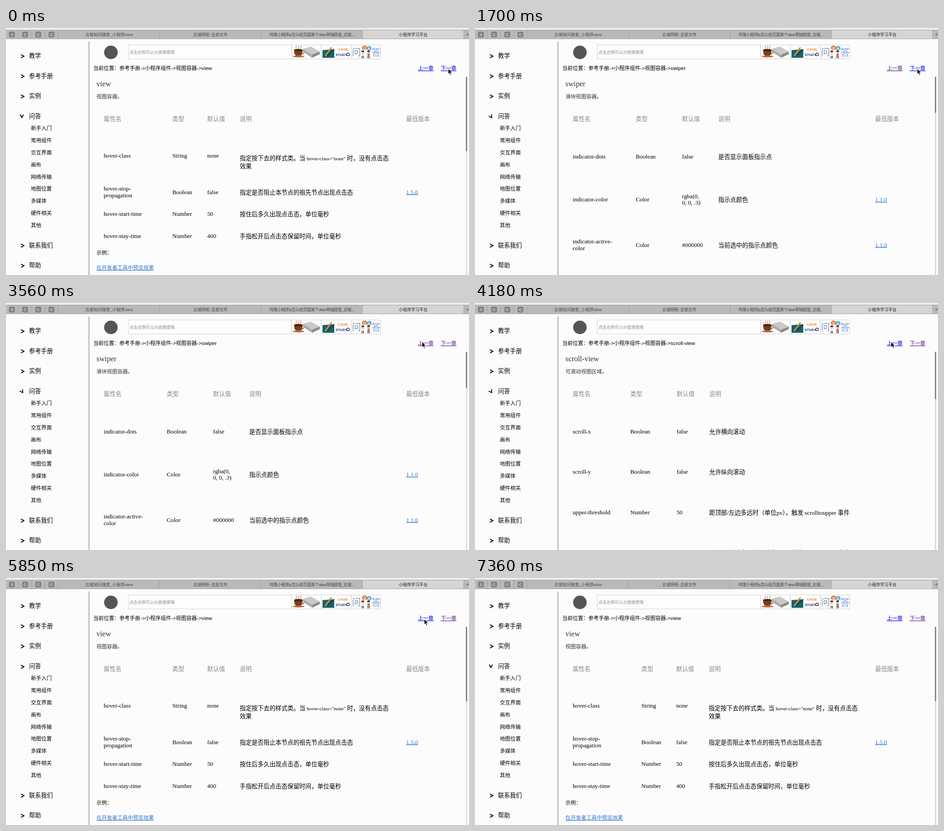
These frames come from a looping animation (1024 by 547 pixels, 7810 ms). An HTML page:

```html
<!DOCTYPE html>
<html lang="zh-CN">
<head>
<meta charset="utf-8">
<title>小程序学习平台</title>
<style>
html, body { margin: 0; width: 100%; height: 100%; overflow: hidden; background: #fcfcfc; }
svg { display: block; width: 100vw; height: 100vh; }
text { font: 11.55px "Liberation Sans", "Noto Sans CJK SC", sans-serif; fill: #000; }
.serif { font-family: "Liberation Serif", "Noto Sans CJK SC", serif; }
.tiny { font-size: 9.08px; }
.cell { font-size: 13.2px; }
.title { font-size: 16.5px; fill: #333; }
.note { fill: #333; }
.soft { fill: #888; }
.bold { font-weight: bold; fill: #222; }
.link { fill: #2f74d0; text-decoration: underline; }
.nav { text-decoration: underline; }
.code { font-size: 10.9px; }
.code-small { font-size: 9.9px; }
.mid { text-anchor: middle; }
</style>
</head>
<body>
<svg id="stage" viewBox="0 0 1024 547" preserveAspectRatio="none"></svg>
<script>
const LOOP = 7810;
const BLUE = '#0000ee', PURPLE = '#551a8b';

const text = (x, y, str, cls = '', extra = '') =>
  `<text x="${x}" y="${y}" class="${cls}" ${extra}>${str}</text>`;
const rect = (x, y, w, h, fill, extra = '') =>
  `<rect x="${x}" y="${y}" width="${w}" height="${h}" fill="${fill}" ${extra}/>`;
const line = (d, stroke, width = 1) =>
  `<path d="${d}" fill="none" stroke="${stroke}" stroke-width="${width}"/>`;

const cell = (x, y, str) => text(x, y, str, 'serif cell');
const link = (x, y, str, size = '') => text(x, y, str, 'serif link ' + size);
const title = (y, str) => text(200, y, str, 'serif title');
const note = (y, str) => text(200, y, str, 'serif note');
const row = (y, xs, values) => values.map((v, i) => cell(xs[i], y, v)).join('');
const wrapped = (x, y, step, lines) => lines.map((s, i) => cell(x, y + i * step, s)).join('');
const header = (y, xs, hasVersion = true) =>
  ['属性名', '类型', '默认值', '说明'].map((s, i) => text(xs[i], y, s, 'serif cell soft')).join('') +
  (hasVersion ? text(885, y, '最低版本', 'serif cell soft') : '');
const support = y => text(200, y,
  '基础库 1.2.0 开始支持，低版本需做<tspan class="link">兼容处理</tspan>', 'serif soft');

function viewPage() {
  const xs = [216, 368, 445, 517];
  return title(129, 'view') + note(156, '视图容器。') + header(206, xs) +
    row(287, xs, ['hover-class', 'String', 'none']) +
    wrapped(517, 293, 18, [
      '指定按下去的样式类。当 <tspan class="code">hover-class="none"</tspan> 时，没有点击态', '效果']) +
    wrapped(216, 360, 14.5, ['hover-stop-', 'propagation']) +
    row(367.5, xs.slice(1), ['Boolean', 'false']) +
    cell(517, 369, '指定是否阻止本节点的祖先节点出现点击态') + link(885, 367.5, '1.5.0', 'cell') +
    row(416, xs, ['hover-start-time', 'Number', '50']) + cell(517, 417, '按住后多久出现点击态，单位毫秒') +
    row(465, xs, ['hover-stay-time', 'Number', '400']) + cell(517, 466, '手指松开后点击态保留时间，单位毫秒') +
    text(200, 502, '示例：', 'serif', 'font-weight="500"') +
    link(200, 535, '在开发者工具中预览效果');
}

function scrollPage() {
  const xs = [216, 343.5, 446, 518];
  const rows = [
    ['scroll-x', 'Boolean', 'false', '允许横向滚动'],
    ['scroll-y', 'Boolean', 'false', '允许纵向滚动'],
    ['upper-threshold', 'Number', '50', '距顶部/左边多远时（单位px），触发 scrolltoupper 事件'],
    ['lower-threshold', 'Number', '50', '距底部/右边多远时（单位px），触发 scrolltolower 事件']
  ];
  return title(129, 'scroll-view') + note(156, '可滚动视图区域。') + header(206, xs, false) +
    rows.map((r, i) => row(289 + i * 89.3, xs, r.slice(0, 3)) + cell(518, 290 + i * 89.3, r[3])).join('');
}

function swiperPage() {
  const xs = [216, 355.5, 458, 538];
  return title(129, 'swiper') + note(156, '滑块视图容器。') + header(206, xs) +
    row(289, xs, ['indicator-dots', 'Boolean', 'false']) + cell(538, 290, '是否显示面板指示点') +
    row(384, xs, ['indicator-color', 'Color']) +
    wrapped(458, 376.5, 14.5, ['rgba(0,', '0, 0, .3)']) +
    cell(538, 385, '指示点颜色') + link(885, 384, '1.1.0', 'cell') +
    wrapped(216, 477, 14.5, ['indicator-active-', 'color']) +
    row(484.5, xs.slice(1), ['Color', '#000000']) +
    cell(538, 485.5, '当前选中的指示点颜色') + link(885, 484.5, '1.1.0', 'cell');
}

function movablePage() {
  const xs = [216, 288.5, 365.5, 438];
  return title(129, 'movable-area') + support(156) +
    note(179.5, '<tspan class="code-small">movable-view</tspan> 的可移动区域') + header(219, xs) +
    wrapped(216, 304, 14.5, ['scale-', 'area']) +
    row(311.5, xs.slice(1), ['Boolean', 'false']) +
    wrapped(438, 304, 18, ['当里面的movable-view设置为支持双指缩放时，设置此值可将缩放手势',
      '生效区域修改为整个movable-area']) + link(885, 311.5, '1.9.90', 'cell') +
    text(200, 389, '注意：movable-area 必须设置width和height属性，不设置默认为10px', 'serif bold') +
    title(437.5, 'movable-view') + support(464) +
    note(487.5, '可移动的视图容器，在页面中可以拖拽滑动') +
    header(538, [216, 310, 413, 485]);
}

const pages = {
  'view': { body: viewPage(), thumb: 165 },
  'scroll-view': { body: scrollPage(), thumb: 105 },
  'swiper': { body: swiperPage(), thumb: 80 },
  'movable-view': { body: movablePage(), thumb: 73 }
};

function tabBar() {
  const names = ['云坡知问搜索_小程序view', '云坡网柜-全部文件',
    '鸣笺小程序js怎么给页面某个view单独赋值_云坡...', '小程序学习平台'];
  let s = rect(0, 0, 1024, 5, '#efefef') + rect(0, 4, 1024, 20, '#b9b9b9') +
    rect(788.5, 4, 224, 20, '#d5d5d5') + line('M0 4.5H1024M0 24H1024', '#a0a0a0');
  ['3', 'C', 'C', 'C'].forEach((c, i) => {
    const x = 13 + i * 29.2;
    s += rect(x - 6.5, 8, 13, 13, '#828282', 'rx="2.5"') +
      text(x, 18, c, 'mid', 'style="font-size:9.5px;font-weight:bold;fill:#d0d0d0"') +
      line(`M${x + 14.5} 5V24`, '#a0a0a0');
  });
  names.forEach((name, i) => {
    const x = 115.5 + i * 224.2;
    const style = `style="fill:${i === 3 ? '#222' : '#484848'}${i === 2 ? ';letter-spacing:-.5px' : ''}"`;
    s += text(x + 112.5, 17.8, name, 'tiny mid', style) + line(`M${x + 224.2} 5V24`, '#a0a0a0');
  });
  return s + line('M1017 14.5H1024M1021 11V18', '#666');
}

const chevron = (x, y, id = '') =>
  `<path ${id} transform="translate(${x} ${y})" d="M-3.3-3.6L3.2 0L-3.3 3.6" fill="none" stroke="#000" stroke-width="1.9"/>`;

function sidebar() {
  const main = [['教学', 61], ['参考手册', 105.5], ['实例', 150], ['问答', 195], ['联系我们', 480.5], ['帮助', 525]];
  const sub = ['新手入门', '常用组件', '交互界面', '画布', '网络传输', '地图位置', '多媒体', '硬件相关', '其他'];
  return rect(182, 30, 3, 517, '#c3c3c3') +
    main.map(([s, y]) => text(51, y + 5, s, 'cell') + (s === '问答' ? '' : chevron(36.5, y + 1.5))).join('') +
    `<g id="fold">${chevron(36.5, 196.5)}</g>` +
    sub.map((s, i) => text(55, 226.3 + i * 26.8, s)).join('');
}

function person(x, color) {
  return `<circle cx="${x}" cy="54" r="3.2" fill="#f0c3a0"/>` +
    `<path d="M${x - 3.2} 53a3.2 3.2 0 0 1 6.4 0z" fill="#3a2a22"/>` +
    line(`M${x} 57V62`, color, 5) + line(`M${x - 1.5} 62V67M${x + 1.5} 62V67`, '#334', 1.6);
}

function searchBar() {
  const bold = (size, fill) => `style="font-size:${size}px;font-weight:bold;fill:${fill}"`;
  const cup = line('M642 46q-2-2 0-4t0-3M647 46q-2-2 0-4t0-3M652 46q-2-2 0-4t0-3', '#a8653a') +
    `<path d="M637 48H656Q656 60 650 62H643Q637 60 637 48Z" fill="#7a3b1c"/>` +
    `<ellipse cx="646.5" cy="48.5" rx="9" ry="2" fill="#3d1b0c"/>` +
    line('M656 50q5 0 3 4t-5 4', '#7a3b1c', 1.6) +
    `<ellipse cx="647" cy="63" rx="13" ry="2.2" fill="#b9703f"/>`;
  const book = `<path d="M657 46L674 41L694 52L677 59Z" fill="#c9c9c9"/>` +
    `<path d="M677 59L694 52V58L677 66Z" fill="#8d8d8d"/><path d="M657 46L677 59V66L657 53Z" fill="#adadad"/>`;
  const study = `<path d="M700 49L726 47V66H700Z" fill="#17646b"/>` +
    line('M706 62L720 43', '#d98a3a', 3) + line('M711 61L726 47', '#263238', 2) +
    text(734, 50, 'CASE', '', bold(8, '#f08a24')) + text(729, 62, 'STUDY', '', bold(7.6, '#20396b')) +
    `<circle cx="756.5" cy="58.5" r="3" fill="none" stroke="#20396b" stroke-width="1.5"/>`;
  const answer = text(765, 60.5, '问', '', 'style="font-size:20px;fill:#7e93ad"') +
    text(808, 61, '答', '', 'style="font-size:21px;fill:#7fa3dc"') +
    `<ellipse cx="793" cy="44" rx="6" ry="5" fill="#e27b3b"/><ellipse cx="803" cy="45" rx="5.5" ry="5" fill="#62a8d8"/>` +
    text(793, 47, 'Q', 'mid', bold(8, '#fff')) + text(803, 48, 'A', 'mid', bold(8, '#fff')) +
    person(789, '#e8e8e8') + person(802, '#d9654f');
  return '<circle cx="232" cy="54" r="15" fill="#555"/>' +
    rect(270.5, 37.5, 558, 31, '#fdfdfd', 'stroke="#d2d2d2"') +
    line('M631.5 38V68M697.5 38V68M763.5 38V68', '#c6c6c6') +
    text(273, 57, '点击右侧可以分类搜索哦', 'tiny', 'style="fill:#8a8a8a"') +
    cup + book + study + answer;
}

const stage = document.getElementById('stage');
stage.innerHTML = rect(0, 0, 1024, 547, '#fcfcfc') + tabBar() + sidebar() + searchBar() +
  text(193, 93.3, '', '', 'id="crumb"') +
  text(911, 93.3, '上一章', 'nav', 'id="prev"') + text(961.5, 93.3, '下一章', 'nav', 'id="next"') +
  rect(1017, 108, 3, 439, '#dcdcdc') + rect(1017, 108, 3, 0, '#868686', 'id="thumb" rx="1"') +
  Object.entries(pages).map(([name, p]) => `<g id="${name}">${p.body}</g>`).join('') +
  '<path id="cursor" d="M0 0V12.2L2.8 9.7L5 14.4L7 13.4L4.9 8.9H8.8Z" fill="#000" stroke="#fff" stroke-width=".9"/>';

const $ = id => document.getElementById(id);

// Each step changes only the listed properties and holds until the next.
const steps = [];
const step = (at, change) => steps.push({ ...steps[steps.length - 1], at, ...change });
function openPage(times, page, prev, next, angles = [55, 80, 90]) {
  times.forEach((at, i) => step(at, { page, prev, next, angle: angles[i] }));
}
const moveTo = (at, x, y) => step(at, { x, y });

step(0, { page: 'view', prev: BLUE, next: BLUE, angle: 90, x: 978, y: 90 });
openPage([300, 480, 660], 'scroll-view', BLUE, BLUE);
openPage([1700, 1850, 2030], 'swiper', PURPLE, BLUE);
openPage([2630, 2780, 2960], 'movable-view', PURPLE, BLUE);
moveTo(3410, 940, 88);
moveTo(3560, 920, 86);
openPage([3560, 3710, 3880], 'swiper', PURPLE, PURPLE);
openPage([4180, 4330, 4480], 'scroll-view', BLUE, PURPLE);
moveTo(4660, 906, 125);
moveTo(4810, 906, 150);
moveTo(4960, 925, 111);
moveTo(5110, 924, 100);
moveTo(5250, 924, 96);
moveTo(5400, 924, 92);
moveTo(5700, 925, 91);
openPage([5850, 6000, 6150], 'view', BLUE, PURPLE, [0, 55, 90]);
moveTo(6310, 905, 115);
moveTo(6470, 900, 200);
moveTo(6620, 868, 312);
moveTo(6770, 846, 345);
moveTo(6920, 848, 420);
moveTo(7070, 862, 465);
moveTo(7220, 940, 525);
moveTo(7360, 945, 570);

function draw(time) {
  const s = steps.filter(k => k.at <= time).pop();
  for (const name in pages) $(name).style.display = name === s.page ? '' : 'none';
  $('crumb').textContent = '当前位置：参考手册->小程序组件->视图容器->' + s.page;
  $('thumb').setAttribute('height', pages[s.page].thumb);
  $('prev').style.fill = s.prev;
  $('next').style.fill = s.next;
  $('fold').setAttribute('transform', `rotate(${s.angle} 36.5 195)`);
  $('cursor').setAttribute('transform', `translate(${s.x} ${s.y})`);
}

const start = performance.now();
function tick() {
  draw((performance.now() - start) % LOOP);
  requestAnimationFrame(tick);
}
tick();
</script>
</body>
</html>
```
